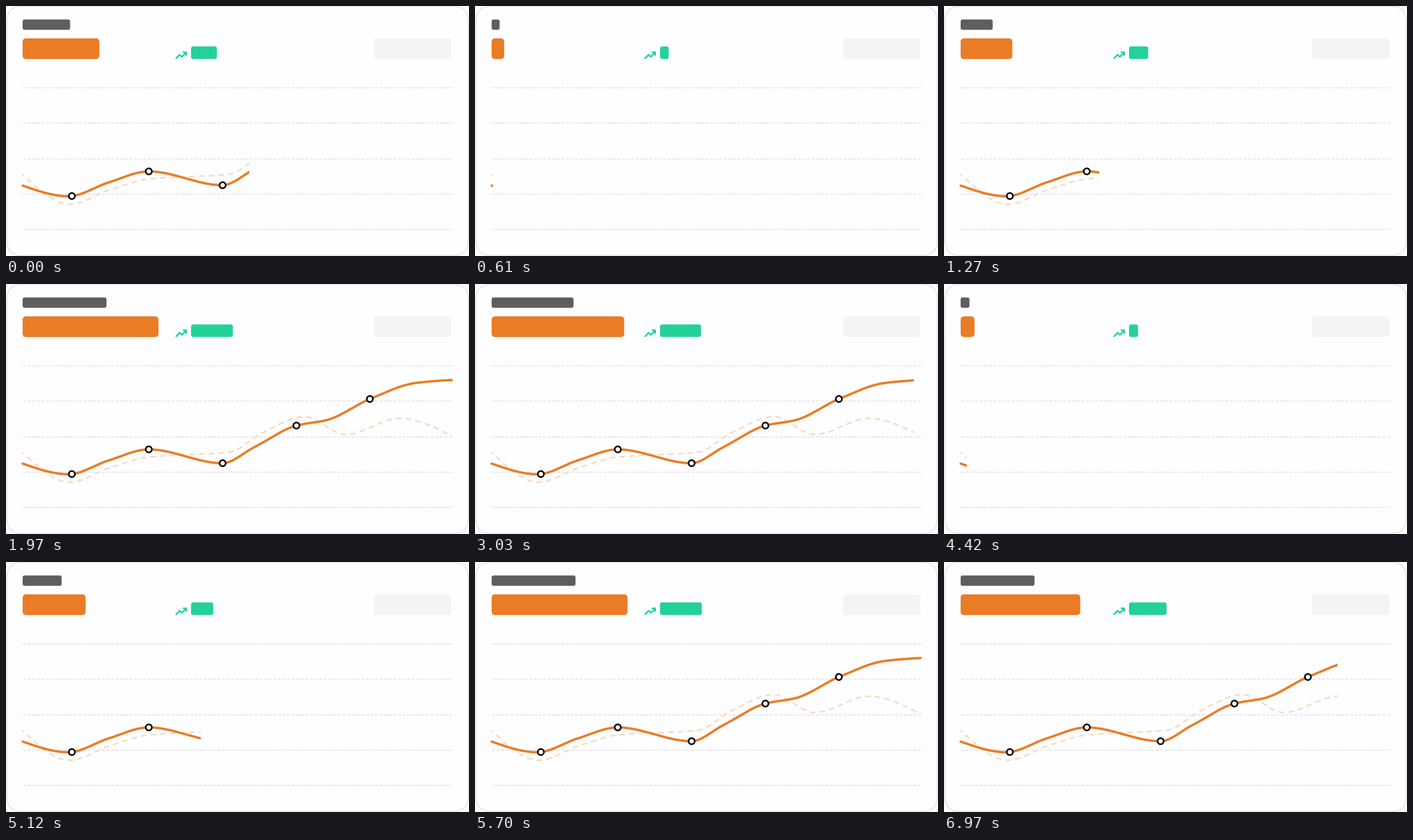
These frames come from a looping animation (668 by 362 pixels, 7000 ms). A matplotlib script:

```python
import numpy as np
import matplotlib.pyplot as plt
from matplotlib.animation import FuncAnimation
from matplotlib.patches import Circle, FancyBboxPatch, Rectangle

W, H, DPI = 668, 362, 100
PX = 72 / DPI
LOOP, STEP = 7000, 20
TICK = 100 / 3

ORANGE, GREEN, GREY = "#E97C24", "#23D298", "#5E5E5E"
LEFT, RIGHT = 24, 643

# The chart closes, then opens again, once per period (all in ms)
FIRST_CLOSING = -897
PERIOD = 3720
OPENING_DELAY = 1460
DURATION = 1400

plt.rcParams["lines.scale_dashes"] = False
fig = plt.figure(figsize=(W / DPI, H / DPI), dpi=DPI, facecolor="white")
ax = fig.add_axes([0, 0, 1, 1])
ax.set_xlim(0, W)
ax.set_ylim(H, 0)
ax.axis("off")


def ease_in(u):
    """Cubic Bezier (0.42, 0) (1, 1), held at 0 and 1 outside its span."""
    s = np.linspace(0, 1, 400)
    x = 1.26 * s * (1 - s) ** 2 + 3 * s**2 * (1 - s) + s**3
    return np.interp(u, x, 3 * s**2 - 2 * s**3)


def openness(t):
    """Share of the chart on show at t: 0 closed, 1 open."""
    phase = (t - FIRST_CLOSING) % PERIOD
    return (1 - ease_in(phase / DURATION)
            + ease_in((phase - OPENING_DELAY) / DURATION))


def smooth(keys):
    """Monotone cubic through the keys, flat at peaks and dips."""
    x, y = np.array(keys, float).T
    h = np.diff(x)
    d = np.diff(y) / h
    a, b = d[:-1], d[1:]
    m = np.zeros_like(x)
    m[1:-1] = np.where(a * b > 0, 2 * a * b / (a + b), 0)
    m[0] = 1.5 * d[0] - 0.5 * m[1]
    m[-1] = 1.5 * d[-1] - 0.5 * m[-2]

    xs = np.linspace(x[0], x[-1], 400)
    i = np.clip(np.searchsorted(x, xs, "right") - 1, 0, len(h) - 1)
    t = (xs - x[i]) / h[i]
    blend = t * t * (3 - 2 * t)
    ys = (y[i] + (y[i + 1] - y[i]) * blend
          + h[i] * t * (1 - t) * (m[i] * (1 - t) - m[i + 1] * t))
    return xs, ys


def rounded(x, y, w, h, r, color, edge="none", lw=0.0):
    box = FancyBboxPatch((x, y), w, h, boxstyle=f"round,pad=0,rounding_size={r}",
                         fc=color, ec=edge, lw=lw * PX)
    return ax.add_patch(box)


def line(xs, ys, color, lw, dash=None, offset=0, z=2):
    style = (offset * PX, [n * PX for n in dash]) if dash else "-"
    return ax.plot(xs, ys, color=color, lw=lw * PX, ls=style, zorder=z,
                   solid_capstyle="round", solid_joinstyle="round",
                   dash_capstyle="butt")[0]


rounded(1.2, 0.4, 665.8, 361, 22, "#FEFDFF", "#E5E5E5", 1.6)
rounded(531, 46.8, 111.5, 30, 5, "#F4F3F5")
for row in range(5):
    y = 118 + 51.25 * row
    line([LEFT, RIGHT], [y, y], "#DEDEE6", 1.2, dash=(4.45, 2.23))

# Rising arrow
line([245.5, 250.5, 253.7, 260], [75.8, 70.5, 73.6, 67.5], GREEN, 2.3)
line([256.2, 260.4, 260.4], [67.4, 67.4, 71.4], GREEN, 2.3)

# Each bar with its closed and open width
bars = [
    (rounded(LEFT, 19.5, 121, 15, 2.8, GREY), 11.4, 121),
    (rounded(LEFT, 46.8, 196, 30, 5.2, ORANGE), 17.9, 196),
    (rounded(267, 58.5, 60, 18.2, 2.8, GREEN), 12.3, 60.3),
]

previous = smooth([(LEFT, 244), (92, 287), (150, 266), (206, 250.5),
                   (322, 243.5), (370, 215.5), (431, 192), (490, 218),
                   (568, 194.5), (RIGHT, 220)])
current = smooth([(LEFT, 260), (90, 275.5), (148, 255.5), (206, 239.5),
                  (312, 259.5), (357, 237), (419, 205), (463, 197),
                  (525, 166.5), (590, 143.5), (RIGHT, 139)])
chart = [line(*previous, "#F8D6B5", 2, dash=(8, 6), offset=5, z=3),
         line(*current, ORANGE, 3.4, z=4)]
for x in (95, 206, 312.5, 419, 525):
    chart.append(ax.add_patch(Circle((x, np.interp(x, *current)), 4.4, fc="white",
                                     ec="black", lw=2.3 * PX, zorder=5)))


def update(i):
    # The picture advances 30 times a second
    t = np.floor((i * STEP + STEP / 2) / TICK) * TICK
    q = openness(t)
    for bar, closed, opened in bars:
        bar.set_width(closed + (opened - closed) * q)
    reveal = Rectangle((0, 0), LEFT + 1 + 625 * q, H, transform=ax.transData)
    for artist in chart:
        artist.set_clip_path(reveal)
        artist.set_visible(q > 0)
    return chart + [bar for bar, *_ in bars]


anim = FuncAnimation(fig, update, frames=LOOP // STEP, interval=STEP,
                     repeat=True, repeat_delay=0, blit=False)
plt.show()
```
